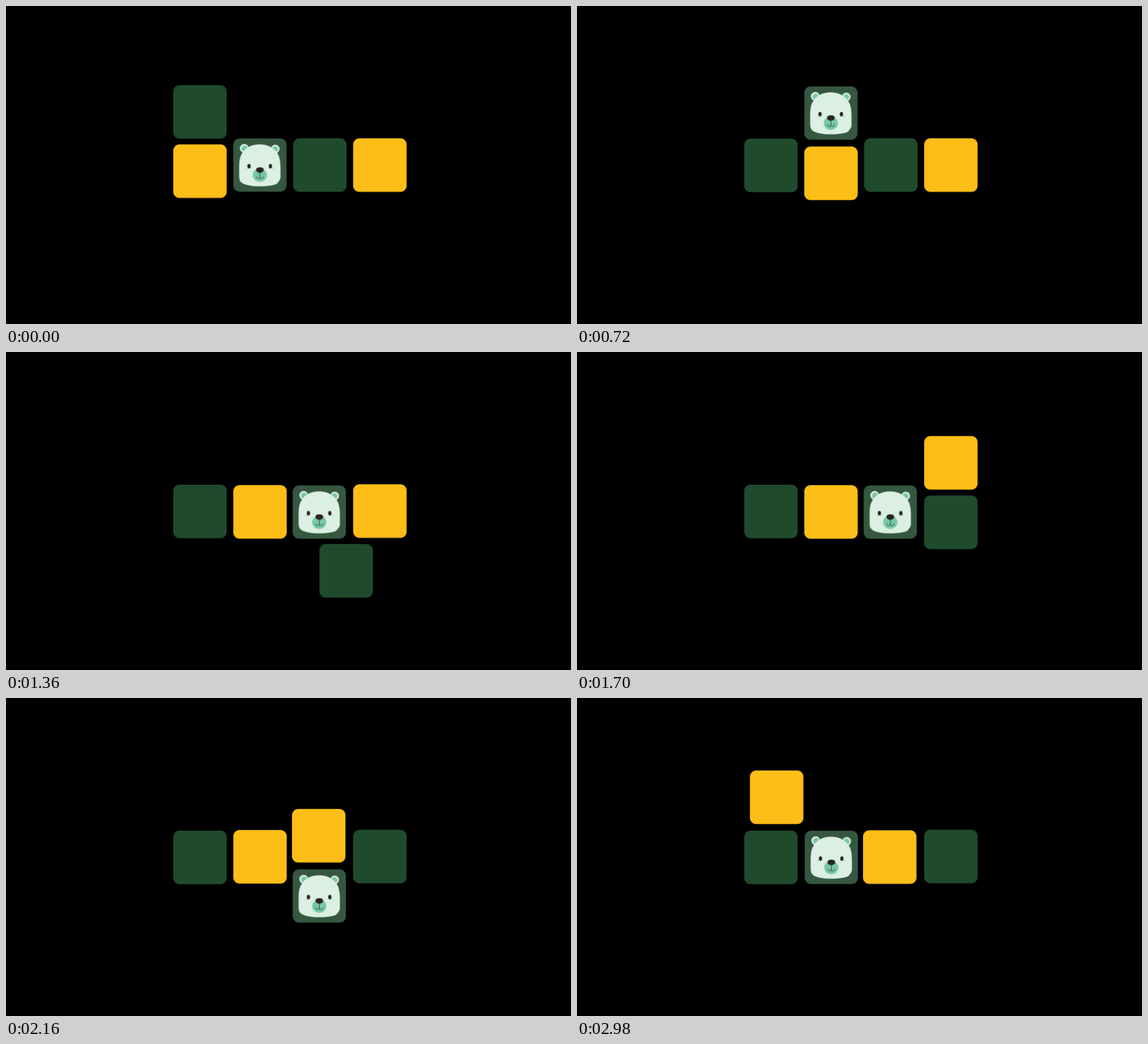
Animation, 998 px wide and 561 px high, one loop 3 s. Source, as an HTML page:

```html
<!DOCTYPE html>
<html lang="en">
<head>
<meta charset="utf-8">
<title>Sliding tiles</title>
<style>
  html, body { margin: 0; width: 100%; height: 100%; overflow: hidden; background: #000; }
  svg { display: block; width: 998px; height: 561px; }

  .tile { animation: 3s linear infinite; }
  .green { fill: #1f4b2c; }
  .yellow { fill: #febe18; }
  .bear { fill: #35573f; }
  .fur { fill: #dbefe3; }
  .mint { fill: #77c8a8; }
  .dark { fill: #2a2519; }
  .mouth { fill: none; stroke: #2a2519; stroke-width: .9; stroke-linecap: round; }

  #green1 { animation-name: green1; }
  #green2 { animation-name: green2; }
  #yellow1 { animation-name: yellow1; }
  #yellow2 { animation-name: yellow2; }
  #bear { animation-name: bear; }

  @keyframes green1 {
    0% { transform: translate(295.4px, 139.2px); }
    8.2%, 100% { transform: translate(295.4px, 234px); }
  }
  @keyframes yellow1 {
    0% { transform: translate(295.4px, 243.8px); }
    8.2%, 8.33% { transform: translate(295.4px, 338.6px); }
    16.75% { transform: translate(401.5px, 338.6px); }
    25.1% { transform: translate(401.5px, 234.6px); }
    66.66% { transform: translate(401.5px, 235px); }
    66.67%, 83.57% { transform: translate(401.5px, 232.9px); }
    91.67%, 91.75% { transform: translate(401.5px, 127.9px); }
    100% { transform: translate(297.5px, 127.9px); }
  }
  @keyframes bear {
    0%, 16.75% { transform: translate(401.5px, 233.6px); }
    25.1% { transform: translate(401.5px, 128.4px); }
    33.3%, 33.5% { transform: translate(506.4px, 128.4px); }
    41.75%, 66.67% { transform: translate(506.4px, 235.4px); }
    75% { transform: translate(506.4px, 339.2px); }
    83.4%, 83.57% { transform: translate(402px, 339.2px); }
    91.67%, 100% { transform: translate(402.3px, 234.2px); }
  }
  @keyframes green2 {
    0%, 33.5% { transform: translate(507.2px, 233.4px); }
    41.75% { transform: translate(507.2px, 338.8px); }
    50% { transform: translate(613.2px, 338.8px); }
    58.33%, 100% { transform: translate(613.2px, 232.4px); }
  }
  @keyframes yellow2 {
    0%, 50% { transform: translate(613.2px, 233.4px); }
    58.33% { transform: translate(613.2px, 127.6px); }
    66.67% { transform: translate(505.2px, 127.6px); }
    75%, 100% { transform: translate(505.2px, 233.4px); }
  }
</style>
</head>
<body>
<svg viewBox="0 0 998 561">
  <defs>
    <rect id="box" width="94.4" height="94.4" rx="11"/>
  </defs>
  <use id="green1" class="tile green" href="#box"/>
  <use id="green2" class="tile green" href="#box"/>
  <use id="yellow1" class="tile yellow" href="#box"/>
  <use id="yellow2" class="tile yellow" href="#box"/>
  <g id="bear" class="tile">
    <rect class="bear" width="94" height="94" rx="11"/>
    <circle class="fur" cx="19.4" cy="17.6" r="7.8"/>
    <circle class="fur" cx="74.2" cy="18.6" r="7.6"/>
    <circle class="mint" cx="20" cy="18" r="5.4"/>
    <circle class="mint" cx="73.8" cy="19" r="5.2"/>
    <path class="fur" d="M46.5 10.4C63 10.4 76 19 80.5 31C83 38 83.4 46 83.4 55L83.4 69C83 73 80.500 75.500 77.500 79.500C73 83 60 84.500 46.500 84.500C33 84.500 22 82.500 16 79C11.500 76 10.400 72 10.400 66L10.400 52C10.400 43 11 35 14 29C19 17.500 31 10.400 46.500 10.400Z"/>
    <ellipse class="mint" cx="46.900" cy="64.800" rx="12.500" ry="11.900"/>
    <ellipse class="dark" cx="27.800" cy="49" rx="2.900" ry="3.900"/>
    <ellipse class="dark" cx="65.600" cy="49" rx="2.900" ry="3.900"/>
    <ellipse class="mint" cx="23.600" cy="53.800" rx="1.200" ry=".8"/>
    <ellipse class="mint" cx="70" cy="53.800" rx="1.200" ry=".8"/>
    <path class="dark" d="M40.300 55.400C40.300 52 43 50.900 47 50.900C51 50.900 53.700 52 53.700 55.400C53.700 58.500 50.500 60.600 47 60.600C43.500 60.600 40.300 58.500 40.300 55.400Z"/>
    <path class="mouth" d="M47 60V68M40.900 67.500C41 72 46.700 72.500 47 68C47.300 72.500 53 72 53.100 67.500"/>
  </g>
</svg>
</body>
</html>
```
